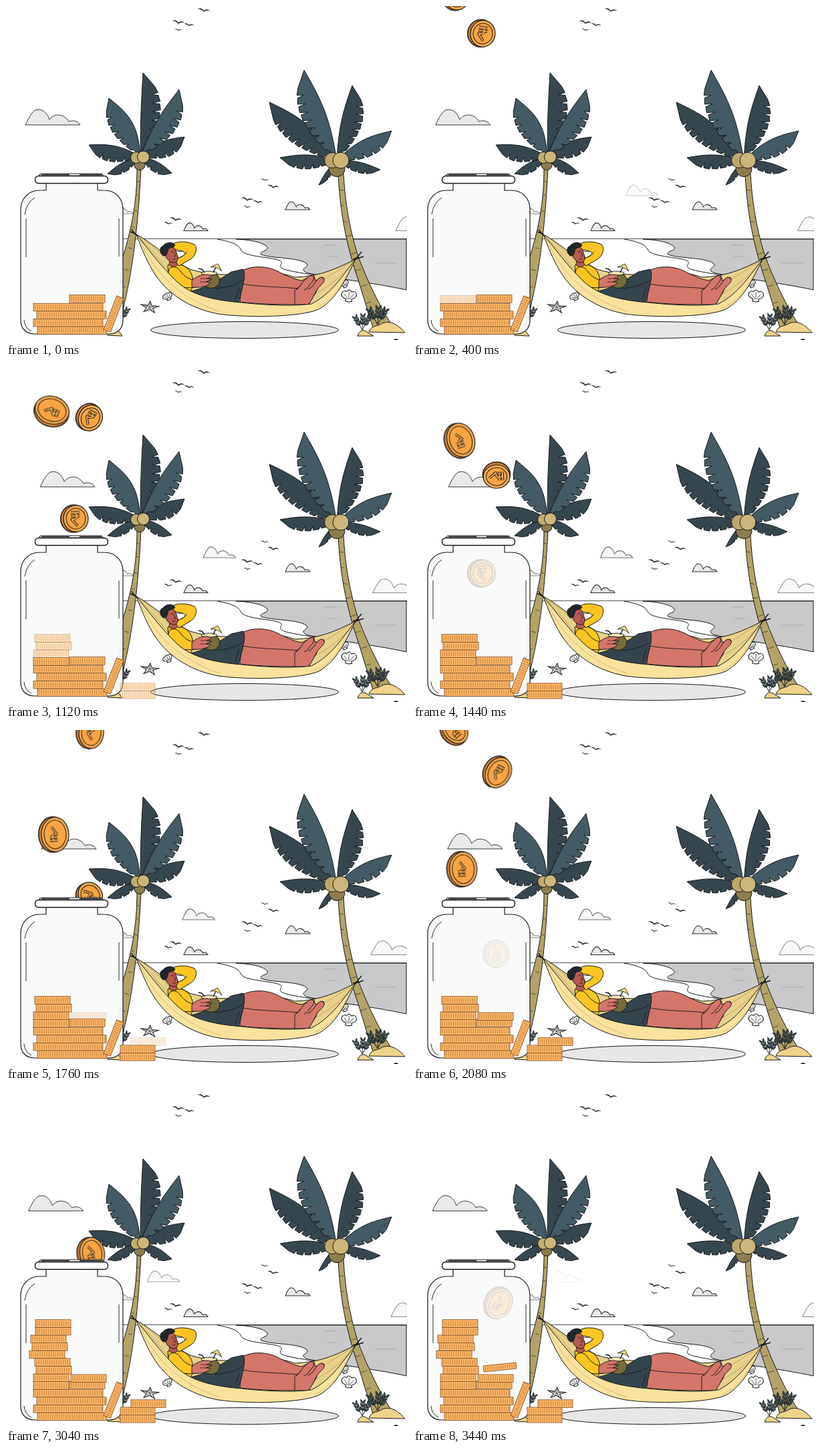
An HTML page with a canvas for the animation above (3.52 s loop, 600 px wide and 500 px high).

```html
<!DOCTYPE html>
<html lang="en">
<head>
<meta charset="utf-8">
<title>Savings by the sea</title>
<style>
  html, body { margin: 0; width: 100%; height: 100%; overflow: hidden; background: #fff; }
  canvas { display: block; width: 600px; height: 500px; }
</style>
</head>
<body>
<canvas id="stage" width="600" height="500"></canvas>
<script>
const stage = document.getElementById('stage').getContext('2d');
const sprite = new OffscreenCanvas(80, 80).getContext('2d');
let ctx = stage;

const LOOP = 3520, STEP = 80, INK = '#16191b';
const SKIN = '#d4756a', DEEP_SKIN = '#b95a50', YELLOW = '#fcc521', NAVY = '#35454d';
const LEAF = '#445a64', DARK_LEAF = '#37474f', TRUNK = '#b3a368', SAND = '#efd38a';

const clamp = v => Math.max(0, Math.min(1, v));
const ease = v => (1 - Math.cos(Math.PI * clamp(v))) / 2;

function paint(fill, width = 1, color = INK, path) {
  const args = path ? [path] : [];
  if (fill) { ctx.fillStyle = fill; ctx.fill(...args); }
  if (width) { ctx.strokeStyle = color; ctx.lineWidth = width; ctx.stroke(...args); }
}
const shape = (d, fill, width, color) => paint(fill, width, color, new Path2D(d));
const line = (d, width, color) => shape(d, null, width, color);

function oval(x, y, rx, ry, fill, width) {
  ctx.beginPath();
  ctx.ellipse(x, y, rx, ry, 0, 0, 7);
  paint(fill, width);
}

function placed(x, y, angle, alpha, draw) {
  ctx.save();
  ctx.translate(x, y);
  ctx.rotate(angle);
  ctx.globalAlpha *= alpha;
  draw();
  ctx.restore();
}

function cloud(x, y, sx, sy, alpha, fill = '#e6e6e6') {
  placed(x, y, 0, alpha, () => {
    ctx.scale(sx, sy);
    shape('M0 0C4-8 10-23 19-23C28-23 33-16 36-8C43-18 58-17 65-5C72-8 79-5 82 0Z', fill, 1 / sx);
  });
}

function bird(x, y, s = 1) {
  placed(x, y, 0.1, 1, () => {
    ctx.scale(s, s);
    shape('M-9-1Q-4-3.5 0 1Q4-3 9 0Q4-1 0 2.4Q-4-1-9-1Z', INK, 0.2);
  });
}

function flock(x, y) {
  bird(x, y);
  bird(x + 16, y + 4, 0.8);
  bird(x, y + 11.5, 0.6);
}

// One edge is a smooth curve bowed by -jag * back, the other is cut into strips.
function frond(bx, by, [tx, ty, jag, back = 0.4], fill) {
  const dx = tx - bx, dy = ty - by, len = Math.hypot(dx, dy);
  const cuts = Math.round(len / 17);
  const at = (u, w) => ctx.lineTo(bx + dx * u - dy / len * w, by + dy * u + dx / len * w);
  const edge = u => jag * Math.sin(Math.PI * Math.pow(u, 1.25)) ** 0.7;
  ctx.beginPath();
  ctx.moveTo(bx, by);
  for (let u = 0.05; u < 1; u += 0.05) at(u, -jag * back * Math.sin(Math.PI * u));
  at(1, 0);
  const step = 0.72 / cuts;
  for (let i = 0; i < cuts; i++) {
    const u = 0.84 - i * step;
    at(u, edge(u));
    at(u - step * 0.68, edge(u - step * 0.68) * 1.04);
    at(u - step * 0.95, edge(u - step) * 0.58);
  }
  ctx.closePath();
  paint(fill);
}

function sprig(x, y, s) {
  for (const lean of [-0.5, 0.05, 0.5]) {
    placed(x, y, lean, 1, () => {
      ctx.scale(s, s);
      line('M0 0V-22', 0.9);
      for (let k = 9; k < 26; k += 6) shape(`M0 ${-k}q-5-1-4-7q4 2 4 7q0-5 4-7q1 6-4 7`, NAVY, 0.5);
    });
  }
}

function shell(x, y, s, angle) {
  placed(x, y, angle, 1, () => {
    ctx.scale(s, s);
    shape('M0 9L-5 8L-4 5Q-14 1-10-5Q-6-9-4-6Q0-12 4-6Q8-9 11-4Q13 2 4 5L5 8Z', '#f4f4f4', 1 / s);
    line('M0 5V-6M-1 5L-7-3M1 5L7-3', 0.6 / s);
  });
}

function beach() {
  line('M175 348.5H600', 1, '#555');
  shape('M344 349C366 350 386 354 391 361C394 367 377 367 382 372C396 378 436 376 449 385C457 391 437 392 449 399C470 405 550 414 599 425V349Z', '#c9c9c9');
  line('M316 349C338 353 347 357 351 364C354 374 383 375 403 379C425 384 398 389 419 395C434 399 460 402 480 407');
  line('M475 358h20M552 385h33M480 375h16', 0.5, '#888');
}

const leafSets = {
  left: {
    dark: [[152, 251, -10], [248, 250, 11], [124, 208, -17], [267, 196, 17], [205, 100, 27, 0.04]],
    light: [[154, 138, -19, 0.7], [259, 125, 25, 0.2]]
  },
  right: {
    dark: [[468, 268, -6], [410, 227, -15], [560, 245, 11], [394, 144, -23, 0.5], [518, 119, 25, 0.2]],
    light: [[577, 187, 18, 0.45], [446, 96, -27, 0.3]]
  }
};

function crown(x, y, { dark, light }) {
  dark.forEach(f => frond(x, y, f, DARK_LEAF));
  light.forEach(f => frond(x, y, f, LEAF));
}

function leftPalm() {
  shape('M196 242C196 295 188 335 171 388L168 480C181 435 196 370 202 242Z', TRUNK);
  line('M196 262l5 2M195 282l3 1M192 306l5 2M188 330l4 2M183 362l6 1M177 394l7 2M174 420l5 1', 0.6);
  crown(201, 225, leafSets.left);
  oval(200, 238, 8, 7.5, '#8d7d4e');
  oval(195, 227, 8.5, 8.5, '#c2ad70');
  oval(205.5, 226, 9, 9, '#cbb67b');
}

function rightPalm() {
  shape('M497 250C500 320 514 372 527 410L550 485H583C562 458 537 403 526 372C513 330 507 290 505 250Z', TRUNK);
  line('M499 275l6 1M501 298l4 1M505 322l6 2M509 345l8-2M516 372l8-3M523 396l8-2M531 420l9-3M539 445l7-2M546 468l11-3', 0.6);
  crown(495, 231, leafSets.right);
  oval(495, 244, 12, 11.5, '#8d7d4e');
  oval(488, 231, 11.5, 11.5, '#bda76b');
  oval(501, 231, 12, 12, '#cbb67b');
  shape('M543 488C547 477 557 480 563 475C573 471 584 474 597 489Z', SAND);
  shape('M526 494C529 485 535 484 540 488L550 494Z', SAND);
  sprig(533, 485, 0.9);
  sprig(556, 477, 1.05);
  shape('M580 500q4-3 7 0', INK);
}

function hammock() {
  shape('M195 342C215 352 232 370 275 394C340 414 385 388 432 406C470 405 495 393 523 379C500 425 470 452 440 452H300C240 430 212 380 195 342Z', '#e8d18b');
  line('M199 347C220 366 238 390 258 416M201 346C222 360 240 378 262 402M519 382C498 396 478 407 462 418M520 383C503 405 482 421 458 433', 0.5, '#8f7c42');
}

function sleeper() {
  shape('M350 443C352 420 354 404 352 397C368 388 392 388 412 400C425 406 434 410 443 411L460 402L463 411L474 406C480 409 471 417 466 421L453 447C420 447 380 447 350 443Z', SKIN);
  line('M354 416C380 421 410 420 436 423M432 447V426L444 415M453 447C456 436 466 431 466 421', 0.9);
  shape('M434 425C441 421 442 413 451 407C458 400 463 405 459 412C453 418 452 423 446 425', SKIN);
  shape('M452 424C462 420 462 410 471 406C480 408 476 414 470 419C462 427 460 438 453 446', SKIN);
  shape('M274 427C290 426 320 410 337 398L355 394C359 402 356 414 348 444C320 443 295 438 268 430Z', NAVY);
  line('M312 423C331 421 343 418 354 411M349 421L343 440', 0.8);
  shape('M242 388C252 384 268 386 276 398C282 410 281 421 274 430C265 428 253 415 244 410Z', YELLOW);
  shape('M245 378L258 376L258 387Q250 393 244 388Z', DEEP_SKIN, 0.8);
  shape('M247 358C254 351 272 352 282 357C288 363 283 375 276 379L259 389C253 385 254 378 261 376C267 373 271 370 264 367L250 364Z', YELLOW);
  line('M264 367Q257 369 252 366M261 376Q270 372 270 368', 0.8);
  shape('M238 366C240 359 250 359 253 364L257 375C258 383 252 386 247 383C241 380 237 373 238 366Z', DEEP_SKIN);
  shape('M235 374C229 369 229 361 235 359C239 353 250 352 253 358C252 362 245 361 243 364L241 371L239 374Z', '#20262a', 0.6);
  line('M247 368l4-1M251 369l3 5l-3 1M249 379q3 1 5-1', 0.8);
  shape('M246 392C240 398 243 411 252 417C264 423 280 423 293 419L300 413L286 409C276 412 267 405 261 397C257 391 251 389 246 392Z', YELLOW);
  oval(307, 411, 13, 11.5, '#756b3b');
  oval(304, 400, 12, 3, '#f1e5b8', 0.9);
  line('M297 399L293 394L288 393M310 399L315 389', 1.4);
  shape('M306 391L317 386L323 397Q314 389 306 391Z', '#f2d777', 0.8);
  shape('M278 411C285 404 296 400 306 403C309 405 303 407 300 408L308 409L299 413L306 414C303 420 288 422 278 421Z', SKIN, 0.9);
  line('M291 408L300 408M290 413L299 413', 0.7);
}

function hammockFront() {
  shape('M195 342C210 360 231 389 256 413C279 434 314 441 353 444C398 449 435 449 457 446C488 430 504 403 523 379C507 412 495 438 468 454C440 466 360 467 318 461C274 453 239 429 220 397C208 377 202 360 195 342Z', '#f8e29c');
  line('M200 350C218 390 250 434 320 457M518 387C500 423 488 441 462 453', 0.5, '#a99659');
  line('M188 334q2 5 7 8M186 338q4 1 9 4', 1.6);
  line('M523 379l9-11M523 379l12-4M519 379l8-2', 1.4);
}

function starfish(x, y) {
  placed(x, y, 0.1, 1, () => {
    ctx.beginPath();
    for (let i = 0; i < 10; i++) {
      const a = i * Math.PI / 5 - Math.PI / 2, r = i % 2 ? 5 : 14;
      ctx.lineTo(r * Math.cos(a), r * 0.65 * Math.sin(a));
    }
    ctx.closePath();
    paint('#ddd');
    line('M0 0V-6M0 0L7-2M0 0L-7-2M0 0L4 5M0 0L-4 5', 0.6);
  });
}

function litter() {
  oval(357, 485, 140.5, 12.5, '#e6e6e6');
  starfish(215, 451);
  shell(513, 434, 1, 0.05);
  shell(506, 416, 0.62, -0.4);
  shell(242, 435, 0.65, -0.5);
  sprig(172, 472, 0.85);
  shape('M152 493C156 485 164 482 169 487L174 494Z', SAND);
}

function jar() {
  shape('M60 265V276H50C34 276 22 288 22 305V470C22 484 31 491 43 491H154C167 491 175 483 175 470V305C175 288 164 276 147 276H137V265Z', 'rgba(249,251,250,.97)', 1.2);
  line('M43 287Q31 294 28 312M30 318V376M169 318V375M27 470Q28 482 38 487', 0.9);
  ctx.beginPath();
  ctx.roundRect(43.5, 254.5, 109, 11, 5);
  paint('#fff', 1.4);
  shape('M50 254Q50 251 54 251H141Q145 251 145 254Z', '#fff', 1.1);
  line('M53 252.5H95M110 252.5H143', 1.5);
}

function pile(x, y, w = 53, h = 11.5) {
  ctx.fillStyle = '#fcb768';
  ctx.fillRect(x, y, w, h);
  ctx.beginPath();
  for (let k = 3; k < w - 1; k += 3.3) {
    ctx.moveTo(x + k, y + 2);
    ctx.lineTo(x + k, y + h - 2);
  }
  paint(null, 0.8, '#b8702b');
  ctx.strokeStyle = '#7a4820';
  ctx.strokeRect(x, y, w, h);
}

function savings(t) {
  const shift = [6, 0, 5, 0, 0, 0, 4, 2, -6, -2, -4, 3, 3];
  const row = (x, y, i, w, from = -LOOP) =>
    placed(x, y - 11.6 * i, 0, clamp((t - from) / 300), () => pile(0, 0, w));
  const arrival = i => i < 4 ? -LOOP : i < 5 ? 300 : i < 8 ? 1000 : i < 11 ? 2160 : 2650;
  shift.forEach((dx, i) => row(41 + dx, 480, i, i < 4 ? 104 : 53, arrival(i)));
  row(95, 479, 4);
  row(97, 481, 5, 53, 1700);
  row(171, 483.5, 0, 52, 1000);
  row(171, 483.5, 1, 52, 1000);
  row(187, 484, 2, 52, 1700);
  placed(161, 461, -1.2, 1, () => pile(-27, -5.5, 54, 11));
  const drop = clamp((t - 3200) / 240);
  placed(130, 392 + 20 * drop, -0.1, drop, () => pile(-24.5, -4.5, 49, 9));
}

// Speeds in px per ms; each coin turns by `spin` over `span` ms.
const coins = [
  { start: 130, x: 103, drift: 0, speed: 0.256, pull: 0, rx: 19.5, ry: 20.5, from: 0.2, spin: -0.3, span: 1400 },
  { start: 320, x: 64, drift: 0.0055, speed: 0.1, pull: 1.95e-5, rx: 21.5, ry: 26.5, from: 0, spin: 3.1, span: 1400 },
  { start: 745, x: 125, drift: 0, speed: 0.272, pull: 0, rx: 18.5, ry: 20.5, from: 0, spin: 3.1, span: 1400 },
  { start: 1590, x: 126, drift: 0.001, speed: 0.186, pull: 0, rx: 19.5, ry: 24.5, from: 0, spin: 3.7, span: 2050 },
  { start: 2033, x: 60, drift: 0.035, speed: 0.62, pull: 0, rx: 18, ry: 22.5, from: 2.4, spin: 0.7, span: 460 }
];

function face(rx, ry, turn) {
  ctx.clearRect(0, 0, 80, 80);
  placed(40, 40, turn, 1, () => {
    const dx = 1.7 * Math.cos(turn), sign = dx < 0 ? -1 : 1;
    oval(-1.7 * sign, 0, rx, ry, '#cf8036', 1.5);
    oval(1.5 * sign, 0, rx - 1, ry - 0.6, '#fcac4f', 1.2);
    oval(1.5 * sign, 0, rx - 5, ry - 5, '#f9a444', 1);
    ctx.lineJoin = 'round';
    ctx.scale(rx / ry, 1);
    const glyph = 'M-6-9H8M-6-4H8M-3-9C6-9 6 1-5 1L4 11';
    line(glyph, 4);
    line(glyph, 2, '#fcac4f');
  });
}

function coin(t, c, inside) {
  const s = t - c.start, y = -28 + c.speed * s + c.pull * s * s;
  if (s < 0 || y > 355 || (y > 250) !== inside) return;
  ctx = sprite;
  face(c.rx, c.ry, c.from + c.spin * ease(s / c.span));
  ctx = stage;
  placed(c.x + c.drift * s, y, 0, inside ? (355 - y) / 225 : 1, () => ctx.drawImage(sprite.canvas, -40, -40));
}

function sky(t) {
  const sway = t < 1600 ? ease(t / 1360) : 1 - ease((t - 1840) / 1680);
  cloud(29 + 24 * sway, 178, 1, 1, 0.85);
  cloud(322 - 116 * ease(t / LOOP), 284, 0.59, 0.7, 0.6 * Math.min(1, t / 1200, (LOOP - t) / 800), '#eee');
  cloud(583 - 37 * sway, 336.5, 0.88, 0.9, 0.5, '#f2f2f2');
  cloud(148, 311, 0.52, 0.55, 0.5);
  cloud(418, 305, 0.45, 0.52, 0.9);
  cloud(266, 336.5, 0.44, 0.52, 0.9);
  flock(258, 24);
  flock(361, 289);
  bird(296, 6);
  bird(387, 260, 0.65);
  bird(400, 270, 0.95);
  bird(254, 319);
  bird(243, 325, 0.7);
}

function draw(t) {
  ctx.fillStyle = '#fff';
  ctx.fillRect(0, 0, 600, 500);
  sky(t);
  beach();
  litter();
  leftPalm();
  rightPalm();
  hammock();
  sleeper();
  hammockFront();
  coins.forEach(c => coin(t, c, false));
  jar();
  savings(t);
  coins.forEach(c => coin(t, c, true));
}

const begin = performance.now();
function tick() {
  const t = (performance.now() - begin) % LOOP;
  draw(Math.floor(t / STEP) * STEP);
  requestAnimationFrame(tick);
}
tick();
</script>
</body>
</html>
```
